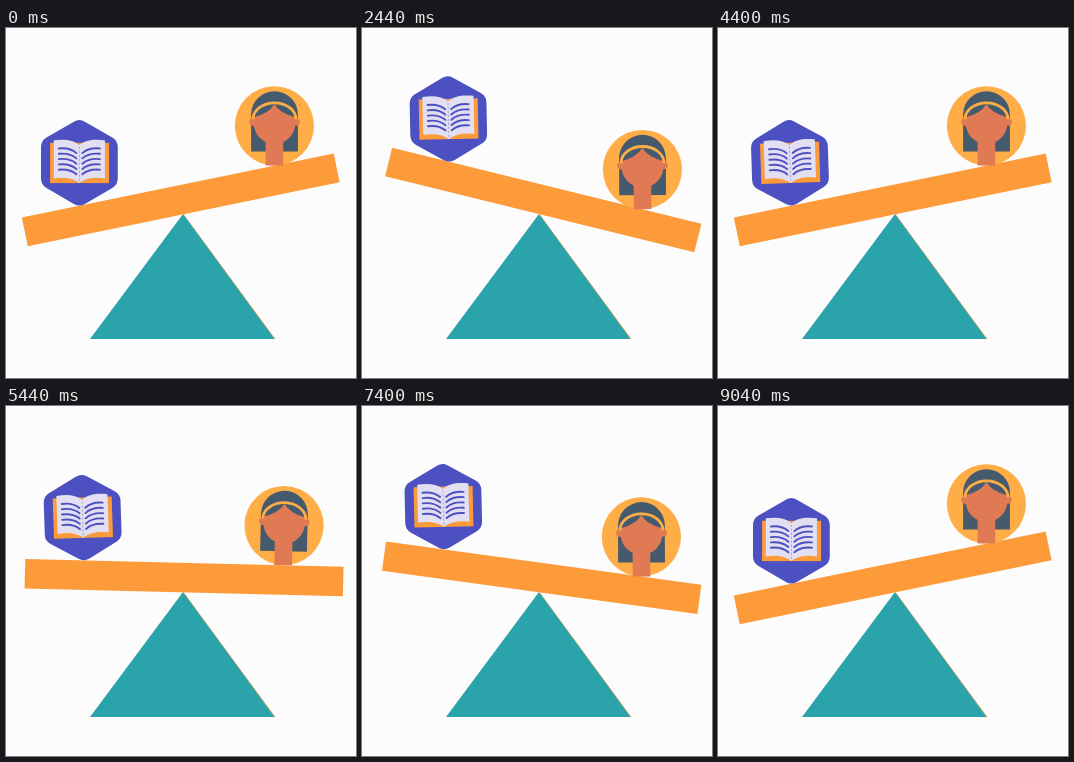
An HTML page that plays this animation: 350 by 350 pixels, repeating every 9080 ms.

```html
<!DOCTYPE html>
<html lang="en">
<head>
<meta charset="utf-8">
<title>Seesaw</title>
<style>
  html, body { margin: 0; width: 100%; height: 100%; overflow: hidden; background: #fcfcfc; }
  svg { display: block; width: 100%; height: 100%; }
</style>
</head>
<body>
<svg viewBox="0 0 350 350">
  <path d="M178 186.5L269.6 311H180z" fill="#fdb56a"/>
  <path d="M177 186L268.6 311H84z" fill="#2ba3ab"/>
  <g id="plank">
    <rect x="-159.2" y="-29.5" width="318.4" height="29.5" fill="#fd9b3b"/>
  </g>

  <!-- Both badges have their origin at the point resting on the plank. -->
  <g id="book">
    <g transform="translate(0 -42.6)">
      <path d="M0-31.6L27.4-15.8V15.8L0 31.6L-27.4 15.8V-15.8z"
            fill="#4d50c1" stroke="#4d50c1" stroke-width="22" stroke-linejoin="round"/>
      <rect x="-29.3" y="-20" width="59" height="40.3" fill="#fd9b3b"/>
      <g id="page">
        <path d="M.3-17.5C-6-23-15-24-25.6-22.5V15.6C-15 14-6 15.5 .3 20.3z" fill="#e2dff2"/>
        <g id="lines" fill="none" stroke="#4d50c1" stroke-width="1.9" stroke-linecap="round"></g>
      </g>
      <use href="#page" transform="scale(-1 1)"/>
      <path d="M0-16V19" stroke="#8f8fd6" stroke-width=".8" stroke-dasharray="2 2"/>
    </g>
  </g>

  <g id="person">
    <g transform="translate(0 -39.5)">
      <circle r="39.6" fill="#ffad47"/>
      <path d="M-23.3 25.7V-11.3A23.4 23.4 0 0 1 23.5-11.3V25.7z" fill="#465a6d"/>
      <g fill="#e07a54">
        <rect x="-8.8" y="12" width="17.6" height="27.6"/>
        <circle cx="-21.3" cy="-4" r="3.9"/>
        <circle cx="21.5" cy="-4" r="3.9"/>
        <path d="M0-21.5Q-6-12-20.8-8.5V-3A20.9 21.2 0 0 0 21-3V-8.5Q6-12 0-21.5z"/>
      </g>
      <path d="M-21.4-6.5A21.5 16.5 0 0 1 21.6-6.5" fill="none" stroke="#ffad47" stroke-width="2.8"/>
    </g>
  </g>
</svg>
<script>
const LOOP = 9080, STEP = 40;
const PIVOT = { x: 177.7, y: 186.3 };
const PLANK_TOP = -29.7, LOW = -11.6, HIGH = 17.8;

// Tracks are [time, degrees] keys.
const plankTrack = [[155, LOW], [1984, HIGH], [2057, HIGH], [4143, LOW],
                    [4515, LOW], [6562, HIGH], [8856, LOW]];
const bookTrack = [[900, 0], [3400, -1.9], [6600, -1.9], [8900, 0]];
const personTrack = [[100, 0], [1000, 1.3], [2200, -0.4], [3300, 0],
                     [4515, 0], [5500, 1.4], [6700, -0.3], [8800, 0]];

const byId = id => document.getElementById(id);

// Cubic Bezier easing (1/6, 0, 5/6, 1), solved by bisection.
function ease(x) {
  let low = 0, high = 1, s = 0.5;
  for (let i = 0; i < 22; i++) {
    s = (low + high) / 2;
    const r = 1 - s;
    if (r * r * s / 2 + 2.5 * r * s * s + s * s * s < x) low = s; else high = s;
  }
  return s * s * (3 - 2 * s);
}

function valueAt(track, t) {
  const next = track.findIndex(([time]) => time > t);
  if (next === 0) return track[0][1];
  if (next < 0) return track[track.length - 1][1];
  const [t0, a] = track[next - 1], [t1, b] = track[next];
  return a + (b - a) * ease((t - t0) / (t1 - t0));
}

function place(id, along, angle, tilt) {
  const rad = angle * Math.PI / 180, cos = Math.cos(rad), sin = Math.sin(rad);
  const x = PIVOT.x + along * cos - PLANK_TOP * sin;
  const y = PIVOT.y + along * sin + PLANK_TOP * cos;
  byId(id).setAttribute('transform', `translate(${x} ${y}) rotate(${tilt})`);
}

function draw() {
  const now = performance.now() % LOOP;
  const t = now - now % STEP;
  const angle = valueAt(plankTrack, t);
  byId('plank').setAttribute('transform', `translate(${PIVOT.x} ${PIVOT.y}) rotate(${angle})`);
  place('book', -100.4, angle, valueAt(bookTrack, t));
  place('person', 98.7, angle, valueAt(personTrack, t));
  requestAnimationFrame(draw);
}

let lines = '';
for (let i = 0; i < 5; i++) lines += `<path d="M-20.5 ${-14.3 + i * 5.3}q11-1.2 17.5 4.6"/>`;
byId('lines').innerHTML = lines;
draw();
</script>
</body>
</html>
```
